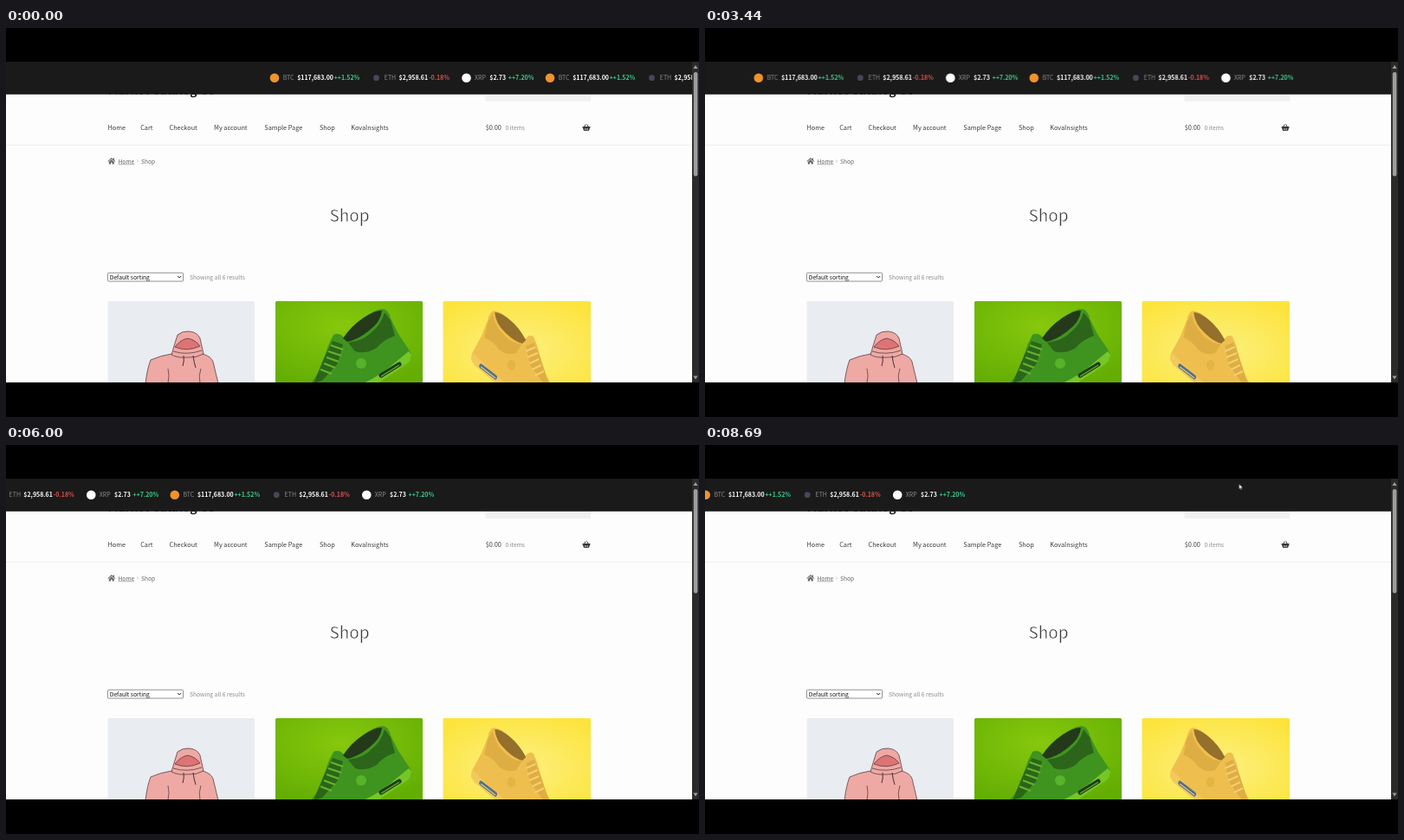
An HTML page for the animation above (8.75 s loop, 800 px wide and 450 px high).

```html
<!DOCTYPE html>
<html lang="en">
<head>
<meta charset="utf-8">
<title>Shop with price ticker</title>
<style>
html, body { margin: 0; width: 100%; height: 100%; overflow: hidden; background: #000; }
svg { display: block; width: 800px; height: 450px; }
text { font-family: "Noto Sans CJK JP", "Noto Sans CJK SC", "Noto Sans CJK", "Open Sans", sans-serif; font-size: 7.3px; fill: #3c3c3c; }
.small { font-size: 6.7px; fill: #666; }
.soft { fill: #8a8a8a; }
.option { fill: #111; }
/* the page-coloured outline thins the strokes to a light weight */
.title { font-size: 19px; font-weight: 300; fill: #333; stroke: #fdfdfd; stroke-width: .55px; }
.brand { font-size: 13.9px; font-weight: 700; fill: #222; }
#quotes text { font-size: 7px; font-weight: 700; fill: #fff; }
#quotes .code { font-weight: 400; fill: #8b8b8b; }
#quotes .up { fill: #3ecf8e; }
#quotes .down { fill: #d9534f; }

/* 140 even steps per loop */
.ticker { animation: slide 8.75s steps(140) -4ms infinite; }
@keyframes slide { from { transform: translateX(310px); } to { transform: translateX(-321.8px); } }

.cursor { animation: roam 8.75s linear infinite; }
@keyframes roam {
  0%, 57.9% { transform: translate(704px, 28px); visibility: hidden; }
  58% { transform: translate(704px, 34px); visibility: visible; }
  60% { transform: translate(705px, 42px); visibility: visible; }
  62% { transform: translate(700px, 26px); visibility: visible; }
  62.1%, 75.9% { transform: translate(794px, 50px); visibility: hidden; }
  76% { transform: translate(792px, 50px); visibility: visible; }
  79%, 100% { transform: translate(616.5px, 45px); visibility: visible; }
}

.green { --body: #3f9420; --dark: #24391a; --mid: #2c6519; --light: #62b52c; --sole: #74c725; --air: #1f3a18; --mark: #58b32a; }
.yellow { --body: #eebf4e; --dark: #94702c; --mid: #dfae43; --light: #f4d074; --sole: #f2c95c; --air: #53708c; --mark: #e5b544; }
</style>
</head>
<body>
<svg viewBox="0 0 800 450">
  <defs>
    <clipPath id="page"><rect y="39" width="792" height="371"/></clipPath>
    <clipPath id="screen"><rect y="39" width="800" height="371"/></clipPath>
    <radialGradient id="lime" cx=".45" cy=".3" r=".75">
      <stop offset="0" stop-color="#86c80c"/><stop offset="1" stop-color="#64ae04"/>
    </radialGradient>
    <radialGradient id="lemon" cx=".5" cy=".6" r=".7">
      <stop offset="0" stop-color="#fdf082"/><stop offset="1" stop-color="#fce43c"/>
    </radialGradient>
    <!-- origin: top left of a 170 px wide product card -->
    <g id="shoe">
      <path fill="var(--body)" d="M40 96 52 80 57 63 62 49 67 39Q72 36 77 40L81 44Q87 31 101 20T124 9Q131 10 133 20L142 38 156 59 157 66 112 96Z"/>
      <path fill="var(--dark)" d="M78 43Q88 28 102 19T123 11Q122 24 107 35 94 45 83 47Z"/>
      <path fill="var(--mid)" d="M84 48Q102 46 112 35 122 27 126 13L133 22 138 40Q124 45 117 54 104 62 92 58Z"/>
      <path fill="var(--mid)" d="M56 66 66 46 78 50 72 72 54 92 44 95Z"/>
      <path fill="none" stroke="var(--light)" stroke-width="2.2" d="M64 51l14 5M61 58l15 5M59 65l14 5M56 72l13 5M52 79l13 5"/>
      <path fill="var(--sole)" d="M154 58 157 62Q157 69 151 73L117 96H99Q116 89 132 76Z"/>
      <path fill="none" stroke="var(--air)" stroke-width="5" stroke-linecap="round" d="M122 86 143 73"/>
      <path fill="none" stroke="var(--light)" stroke-width="1.2" d="M122 87 143 74"/>
      <circle cx="99" cy="72" r="6" fill="var(--mark)"/>
    </g>
    <g id="quotes">
      <circle cy="57.7" r="5.3" fill="#f0932b"/>
      <text class="code" x="9.7" y="60.2">BTC</text><text x="26.2" y="60.2">$117,683.00</text><text class="up" x="68.7" y="60.2">++1.52%</text>
      <circle cx="117.5" cy="57.7" r="3.4" fill="#454859"/>
      <text class="code" x="126.8" y="60.2">ETH</text><text x="143.6" y="60.2">$2,958.61</text><text class="down" x="178" y="60.2">-0.18%</text>
      <circle cx="221.5" cy="57.7" r="5.3" fill="#fff"/>
      <text class="code" x="231" y="60.2">XRP</text><text x="248.3" y="60.2">$2.73</text><text class="up" x="269.8" y="60.2">++7.20%</text>
    </g>
  </defs>

  <rect width="800" height="450"/>
  <g clip-path="url(#page)">
    <rect y="39" width="792" height="371" fill="#fdfdfd"/>
    <text class="brand" x="117.5" y="77.4">Market Catalog Co</text>
    <rect x="553.5" y="70" width="121.5" height="15" fill="#f1f1f1"/>

    <text x="117.5" y="118">Home</text>
    <text x="155.2" y="118">Cart</text>
    <text x="188.5" y="118">Checkout</text>
    <text x="240" y="118">My account</text>
    <text x="298.3" y="118">Sample Page</text>
    <text x="362" y="118">Shop</text>
    <text x="398.3" y="118">KovaInsights</text>
    <text x="553.7" y="118">$0.00</text>
    <text class="small soft" x="576.5" y="118">0 items</text>
    <g fill="none" stroke="#333">
      <path d="M667.2 115l2-3.5M672.6 115l-2-3.5"/>
      <path stroke-width="1.5" d="M665.5 114.8h9"/>
      <path fill="#333" d="M666.6 115.5h6.8l-.6 2.8h-5.6z"/>
      <path stroke="#fdfdfd" stroke-width=".6" d="M668.6 116v2M670 116v2M671.4 116v2"/>
    </g>
    <path stroke="#f0f0f0" d="M0 135.5h792"/>

    <path fill="#666" d="M117.3 154.2 121.8 150 123.8 151.8V150.6H125V153L126.3 154.2 125.6 154.8 121.8 151.4 118 154.8ZM118.8 155 121.8 152.3 124.8 155V157.6H122.6V155.4H121V157.6H118.8Z"/>
    <text class="small" x="129.5" y="156.7">Home</text>
    <path stroke="#777" stroke-width=".6" d="M129.5 157.8H148.2"/>
    <path fill="none" stroke="#bbb" stroke-width=".7" d="M151.2 152.4l1.4 1.6-1.4 1.6"/>
    <text class="small" x="156" y="156.7">Shop</text>

    <text class="title" x="373.5" y="224">Shop</text>

    <rect x="117.5" y="283.2" width="87" height="9.8" rx="1" fill="#fff" stroke="#767676" stroke-width=".8"/>
    <text class="small option" x="119.8" y="290.6">Default sorting</text>
    <path fill="none" stroke="#222" d="M198.2 287l2 2 2-2"/>
    <text class="small soft" x="212" y="290.6">Showing all 6 results</text>

    <rect x="117.5" y="316" width="169.5" height="95" rx="1.5" fill="#e9ecf1"/>
    <g stroke="#4a2f31" stroke-width=".7" stroke-linejoin="round" fill="#eea9a4">
      <path d="M161 411Q163 394 167 384 178 379 191 377H227Q237 380 239 386L245 411Z"/>
      <path d="M191 378Q195 364 198 355 204 350 212 351 221 352 224 359L228 377Q219 382 210 381 198 382 191 378Z"/>
      <path fill="#dd7474" d="M195 369Q202 360 210 359 219 361 224 368 209 375 195 369Z"/>
      <path fill="none" d="M193 374Q209 379 226 373M187 411Q189 402 187 394M224 411Q222 402 225 394"/>
      <path fill="none" stroke-width="1" d="M205 379Q206 385 204 391M216 379Q217 387 219 393"/>
    </g>

    <rect x="311" y="316" width="170" height="95" rx="1.5" fill="url(#lime)"/>
    <use href="#shoe" class="green" x="311" y="316"/>
    <rect x="504.5" y="316" width="170.5" height="95" rx="1.5" fill="url(#lemon)"/>
    <use href="#shoe" class="yellow" transform="translate(662.6 318) scale(-.8 1)"/>

    <rect y="39" width="792" height="37.8" fill="#1a1a1a"/>
    <g class="ticker"><use href="#quotes"/><use href="#quotes" x="318"/></g>
  </g>

  <rect x="792" y="39" width="8" height="371" fill="#2b2b2b"/>
  <rect x="793.8" y="51" width="4.6" height="120.5" rx="2.3" fill="#9d9d9d"/>
  <path fill="#9d9d9d" d="M793.4 47l2.6-4 2.6 4zM793.4 402.5l2.6 4 2.6-4z"/>

  <g clip-path="url(#screen)">
    <path class="cursor" fill="#fff" stroke="#111" stroke-width=".5" d="M0 0V6.2L1.4 4.9 2.4 7.1 3.4 6.7 2.5 4.5H4.4Z"/>
  </g>
</svg>
</body>
</html>
```
